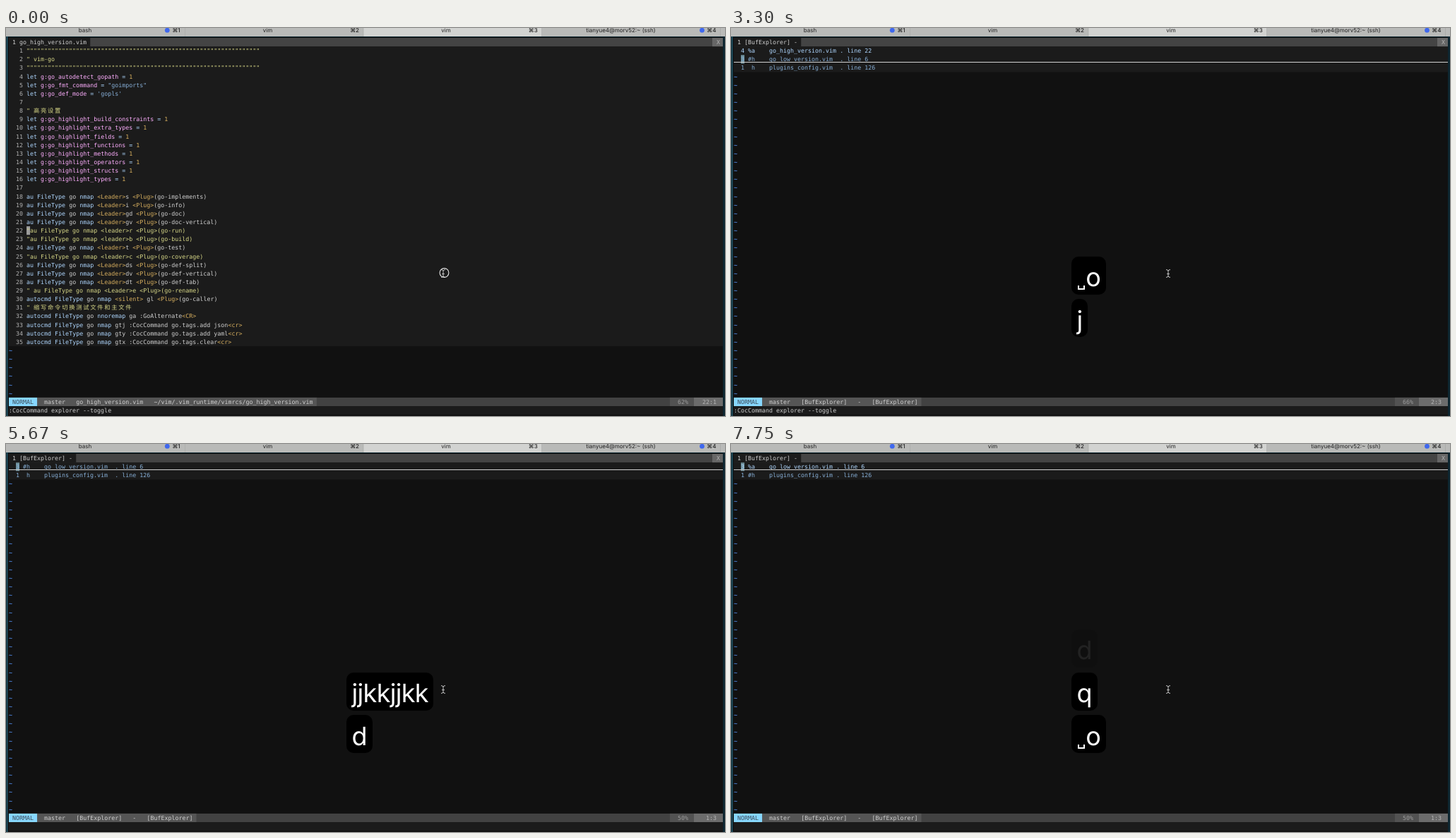
An HTML page that plays this animation: 1018 by 550 pixels, repeating every 8000 ms.

```html
<!DOCTYPE html>
<html lang="en">
<head>
<meta charset="utf-8">
<title>Vim buffer list</title>
<style>
html, body { margin: 0; width: 100%; height: 100%; overflow: hidden; background: #111; }
svg { position: absolute; left: 0; top: 0; display: block; }
text { white-space: pre; text-rendering: geometricPrecision; }
.term text { font: 8.32px "DejaVu Sans Mono", monospace; fill: #d0d0d0; }
.cjk { font-family: "Noto Sans CJK SC", "Noto Sans CJK", sans-serif; font-size: 8.3px; font-weight: 300; letter-spacing: 1.72px; }
.term .note { fill: #d7d787; }
.term .word { fill: #afd7ff; }
.term .name { fill: #ffafff; }
.term .gold { fill: #d7af5f; }
.term .num { fill: #b2b2b2; }
.term .blue { fill: #87afd7; }
.term .tilde { fill: #4f86e0; font-weight: bold; }
.term .dark { fill: #3a4a54; }
.term .dim { fill: #9c9c9c; }
.term .pos { fill: #b4b4b4; }
.tabs text { font: 8px Inter, sans-serif; fill: #222; text-anchor: middle; }
.tabs .cmd { font-family: Inter, "DejaVu Sans", sans-serif; font-weight: 500; }
.key {
  position: absolute; left: 482px; height: 54px; box-sizing: border-box;
  padding: 2.2px 7.6px 0; border-radius: 10px; background: #000; color: #fff;
  font: 36px/54px Inter, sans-serif; letter-spacing: -.02em;
  white-space: nowrap; text-rendering: geometricPrecision;
}
.space {
  display: inline-block; box-sizing: border-box; width: 9.4px; height: 6.5px; margin: 0 1.7px;
  border: 2px solid #fff; border-top: 0; vertical-align: -5.5px;
}
</style>
</head>
<body>
<svg width="1018" height="550" viewBox="0 0 1018 550">
  <rect width="1018" height="550" fill="#0d2630"/>
  <rect x="1" y="12" width="1.2" height="538" fill="#28596a"/>
  <rect x="3" y="13" width="1012" height="537" fill="#111"/>
  <g class="tabs" id="tabs"></g>
  <g class="term" id="term"></g>
  <g fill="none" stroke-linecap="round">
    <path stroke="#111" stroke-width="2.6" d="M616.4 342.6q2 0 2.6 1.5q.6-1.5 2.6-1.5M619 344v8M616.4 353.4q2 0 2.6-1.5q.6 1.5 2.6 1.5M617.5 348.6h3"/>
    <path stroke="#c8c8c8" d="M616.4 342.6q2 0 2.6 1.5q.6-1.5 2.6-1.5M619 344v8M616.4 353.4q2 0 2.6-1.5q.6 1.5 2.6 1.5M617.5 348.6h3"/>
    <circle id="ring" cx="620.5" cy="347" r="6.4" stroke="#e4e4e4" stroke-width="1.1"/>
  </g>
</svg>
<div id="keys"></div>
<script>
const LOOP = 8000, COL = 5.01, ROW = 12.14, LEFT = 4, TOP = 14, RIGHT = 1015;
const $ = id => document.getElementById(id);
const x = col => LEFT + col * COL;
const y = row => TOP + row * ROW;
const esc = s => s.replace(/&/g, '&amp;').replace(/</g, '&lt;');
const box = (x1, row, x2, fill, rows = 1) =>
  `<rect x="${x1}" y="${y(row)}" width="${x2 - x1}" height="${ROW * rows}" fill="${fill}"/>`;
const raw = (col, row, html, cls = '') =>
  `<text x="${x(col)}" y="${y(row) + 9}" class="${cls}">${html}</text>`;
const put = (col, row, s, cls) => raw(col, row, esc(s), cls);
const span = (cls, s) => `<tspan class="${cls}">${s}</tspan>`;

const options = ['build_constraints', 'extra_types', 'fields', 'functions', 'methods', 'operators', 'structs', 'types'];
const shared = ['', '" 高亮设置', ...options.map(o => `let g:go_highlight_${o} = 1`), ''];
const tail = [
  '" 缩写命令切换测试文件和主文件',
  'autocmd FileType go nnoremap ga :GoAlternate<CR>',
  'autocmd FileType go nmap gtj :CocCommand go.tags.add json<cr>',
  'autocmd FileType go nmap gty :CocCommand go.tags.add yaml<cr>',
  'autocmd FileType go nmap gtx :CocCommand go.tags.clear<cr>'
];
const silent = s => 'autocmd FileType go nmap <silent> ' + s;
const au = s => 'au FileType go nmap ' + s;
const rule = '"'.repeat(66);

const files = {
  high: {
    name: 'go_high_version.vim', at: [22, 0], pct: '62%', pos: '22:1', fill: '#1b1b1b', empty: '#111',
    lines: [
      rule, '" vim-go', rule,
      'let g:go_autodetect_gopath = 1',
      'let g:go_fmt_command = "goimports"',
      "let g:go_def_mode = 'gopls'",
      ...shared,
      au('<Leader>s <Plug>(go-implements)'),
      au('<Leader>i <Plug>(go-info)'),
      au('<Leader>gd <Plug>(go-doc)'),
      au('<Leader>gv <Plug>(go-doc-vertical)'),
      '"' + au('<leader>r <Plug>(go-run)'),
      '"' + au('<leader>b <Plug>(go-build)'),
      au('<leader>t <Plug>(go-test)'),
      '"' + au('<leader>c <Plug>(go-coverage)'),
      au('<Leader>ds <Plug>(go-def-split)'),
      au('<Leader>dv <Plug>(go-def-vertical)'),
      au('<Leader>dt <Plug>(go-def-tab)'),
      '" ' + au('<Leader>e <Plug>(go-rename)'),
      silent('gl <Plug>(go-caller)'),
      ...tail
    ]
  },
  low: {
    name: 'go_low_version.vim', at: [6, 24], pct: '20%', pos: '6:25', fill: '#1a1a1a', empty: '#1a1a1a',
    lines: [
      '" GoTo code navigation.',
      'let g:go_fmt_command = "goimports"',
      "let g:go_def_mode = 'godef'",
      'let g:go_imports_autosave = 1',
      '" 对于低版本需要禁止gopls',
      'let g:go_gopls_enabled = 0',
      ...shared,
      '" 快捷键设置',
      silent('gd <Plug>(go-def)'),
      silent('gy <Plug>(go-def-type)'),
      silent('gi <Plug>(go-implements)'),
      silent('gr <Plug>(go-referrers)'),
      silent('<leader>rn <Plug>(go-rename)'),
      silent('gl <Plug>(go-caller)'),
      'autocmd FileType go vnoremap <silent> gv :GoFreevars <CR>',
      ...tail
    ]
  }
};

const lowRow = ' 3 #h    go_low_version.vim  . line 6';
const plugRow = ' 1  h    plugins_config.vim  . line 126';
const lists = {
  three: [' 4 %a    go_high_version.vim . line 22', lowRow, plugRow],
  two: [lowRow, plugRow],
  last: [' 3 %a    go_low_version.vim . line 6', ' 1 #h    plugins_config.vim . line 126']
};

// [time, screen, list row, keys from the bottom up, opacity of the top key]
const all = 'jjkkjjkk';
const steps = [
  [0, 'high', 0, []],
  [1350, 'high', 0, ['_']],
  [1500, 'three', 1, ['_o']],
  [3300, 'three', 2, ['j', '_o']],
  [3440, 'three', 3, ['jj', '_o'], .5],
  [3590, 'three', 3, ['jj', '_o'], .07],
  [3740, 'three', 2, ['jjk']],
  [3890, 'three', 1, ['jjkk']],
  [4180, 'three', 2, ['jjkkj']],
  [4330, 'three', 3, ['jjkkjj']],
  [4480, 'three', 2, ['jjkkjjk']],
  [4620, 'three', 2, [all]],
  [4770, 'three', 1, [all]],
  [5670, 'two', 1, ['d', all]],
  [6260, 'two', 1, ['q', 'd', all]],
  [6410, 'low', 0, ['q', 'd', all]],
  [6710, 'low', 0, ['q', 'd', all], .3],
  [6860, 'low', 0, ['q', 'd']],
  [7450, 'low', 0, ['_', 'q', 'd']],
  [7600, 'last', 1, ['_o', 'q', 'd'], .5],
  [7750, 'last', 1, ['_o', 'q', 'd'], .07]
];

function paint(line) {
  if (line[0] === '"')
    return span('note', esc(line).replace(/[\u4e00-\u9fff]+/g, s => span('cjk', s)));
  const token = /(^let|^autocmd|^au|FileType|\b[nv](?:nore)?map\b|=)|(g:\w+)|("[^"]*"|'[^']*')|(<\w+>|\b\d+$)/g;
  let out = '', end = 0;
  for (const m of line.matchAll(token)) {
    const cls = m[1] ? 'word' : m[2] ? 'name' : m[3] ? 'blue' : 'gold';
    out += esc(line.slice(end, m.index)) + span(cls, esc(m[0]));
    end = m.index + m[0].length;
  }
  return out + esc(line.slice(end));
}

function tildes(first) {
  let out = '';
  for (let r = first; r < 42; r++) out += put(0, r, '~', 'tilde');
  return out;
}

function frame(title, gap, parts, pct, pos) {
  let col = 10, words = '';
  for (const p of parts) {
    words += put(col, 42, p);
    col += p.length + 3;
  }
  return box(LEFT, 0, RIGHT, '#444') + box(LEFT, 0, x(gap), '#1c1c1c') + put(1, 0, '1 ' + title)
    + box(1000, 0, RIGHT, '#666') + put(200, 0, 'X', 'pos')
    + box(LEFT, 42, RIGHT, '#424242') + box(x(8), 42, x(col - 2), '#555') + box(LEFT, 42, x(8), '#87d7ff')
    + put(1, 42, 'NORMAL', 'dark') + words
    + box(940, 42, 974, '#525252') + box(974, 42, RIGHT, '#6c6c6c')
    + put(192 - pct.length, 42, pct, 'dim')
    + put(198 - pos.indexOf(':'), 42, pos, 'pos');
}

function drawFile(f) {
  const n = f.lines.length, [row, col] = f.at;
  return box(LEFT, 1, RIGHT, f.empty, 41) + box(LEFT, 1, RIGHT, f.fill, n)
    + box(x(5 + col), row, x(6 + col), '#9c9c9c')
    + f.lines.map((s, i) => put(1, i + 1, String(i + 1).padStart(3), 'num') + raw(5, i + 1, paint(s))).join('')
    + tildes(n + 1)
    + frame(f.name, f.name.length + 4, ['master', f.name, '~/vim/.vim_runtime/vimrcs/' + f.name], f.pct, f.pos);
}

function drawList(rows, at) {
  const n = rows.length, line = Math.round(y(at + 1) - 2);
  return box(LEFT, 1, RIGHT, '#111', 41) + box(LEFT, 1, RIGHT, '#1b1b1b', n)
    + box(x(2), at, x(3), '#6f919c')
    + rows.map((s, i) => put(1, i + 1, s, s.includes('%') ? 'word' : 'blue')).join('')
    + `<rect x="${LEFT}" y="${line}" width="${RIGHT - LEFT}" height="1" fill="#d0d0d0"/>`
    + tildes(n + 1)
    + frame('[BufExplorer] -', 19, ['master', '[BufExplorer]', '-', '[BufExplorer]'],
      Math.floor(100 * at / n) + '%', at + ':3');
}

function drawKeys(keys, fade = 1) {
  return keys.map((k, i) => {
    const alpha = i === keys.length - 1 ? fade : 1;
    const label = k.replace('_', '<span class="space"></span>');
    return `<div class="key" style="top:${384.4 - i * 60.7}px;opacity:${alpha}">${label}</div>`;
  }).join('');
}

function drawTabs() {
  const names = ['bash', 'vim', 'vim', 'tianyue4@morv52:~ (ssh)'];
  return '<rect width="1018" height="12" fill="#b9bab8"/>' + names.map((name, i) => {
    const left = i * 252.7 + 1;
    const mid = [112, 370.5, 623, 870.5][i];
    return `<rect x="${left}" width="252.7" height="12" fill="${i === 2 ? '#d2d3d1' : '#b9bab8'}"/>`
      + `<rect x="${left + 252}" width=".7" height="12" fill="#a4a5a3"/>`
      + `<text x="${mid}" y="6.4">${name}</text>`
      + `<text x="${241 + i * 252.6}" y="6.4" class="cmd">⌘${i + 1}</text>`
      + (i % 3 ? '' : `<circle cx="${228.3 + i * 252.4}" cy="3.2" r="3.4" fill="#3f68ee"/>`);
  }).join('');
}

function draw([time, screen, at, keys, fade]) {
  const body = files[screen] ? drawFile(files[screen]) : drawList(lists[screen], at);
  const command = time < 5670 ? put(0, 43, ':CocCommand explorer --toggle') : '';
  $('term').innerHTML = body + box(LEFT, 43, RIGHT, '#1b1b1b') + command;
  $('keys').innerHTML = drawKeys(keys, fade);
}

$('tabs').innerHTML = drawTabs();
const start = performance.now();
let shown;
function tick() {
  const t = (performance.now() - start) % LOOP;
  const step = steps.findLast(s => s[0] <= t);
  if (step !== shown) draw(shown = step);
  $('ring').style.display = t < 150 ? '' : 'none';
  requestAnimationFrame(tick);
}
tick();
</script>
</body>
</html>
```
